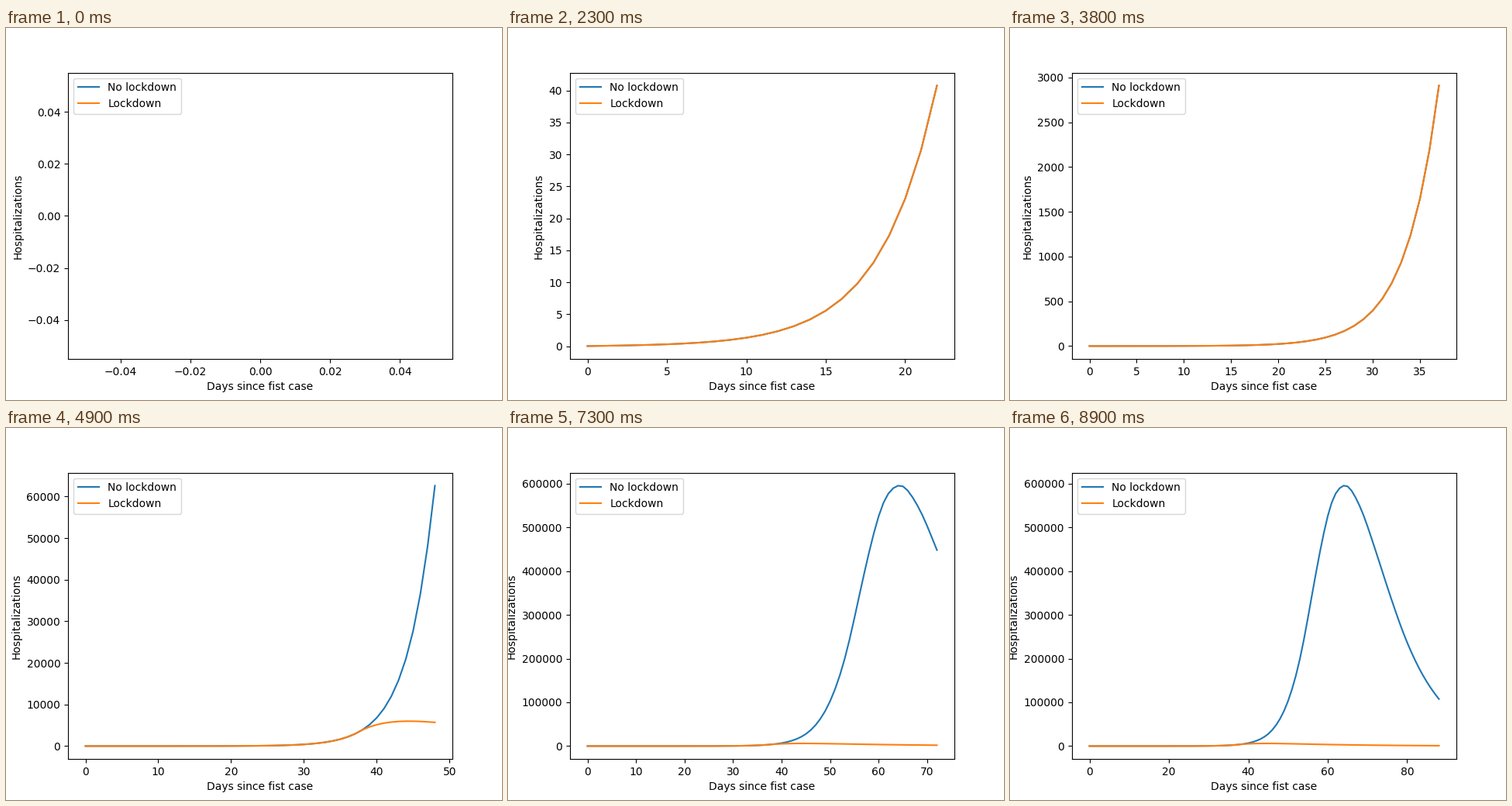
Animation of 640 by 480 pixels, one loop 9 s. Source, as a matplotlib script:

```python
import numpy as np
import matplotlib.pyplot as plt
from matplotlib.animation import FuncAnimation

FRAMES = 90
GROWTH = 0.2846
LOCK_DAY = 38
days = np.arange(FRAMES)


def early(n):
    """Outbreak growth before saturation sets in."""
    return 0.05855 * (np.exp(GROWTH * (n + 1)) - 0.766 ** (n + 1))


def hermite(x, xs, ys):
    """Smooth cubic curve through the points (xs, ys)."""
    m = np.gradient(ys, xs, edge_order=2)
    i = np.clip(np.searchsorted(xs, x, side="right") - 1, 0, len(xs) - 2)
    h = xs[i + 1] - xs[i]
    t = (x - xs[i]) / h
    return (ys[i] * (1 + 2 * t) * (1 - t) ** 2 + ys[i + 1] * t * t * (3 - 2 * t)
            + h * (m[i] * t * (1 - t) ** 2 - m[i + 1] * t * t * (1 - t)))


def no_lockdown():
    # Saturation bends the exponential through these levels (thousands).
    knots = np.arange(32, 89, 4)
    levels = 1000 * np.array([6.78, 20.9, 62.6, 162, 344, 526, 595.7, 550,
                              448.4, 336.8, 237, 161.4, 107.6])
    bend = np.append([0, 0], np.log(levels / early(knots[2:])))
    late = days >= knots[1]
    values = early(days)
    values[late] *= np.exp(hermite(days[late], knots, bend))
    return values


def lockdown(free):
    t = np.maximum(days - LOCK_DAY, 0)
    peak = 11500
    eased = peak * np.exp(-0.052 * t) - (peak - free[LOCK_DAY]) * np.exp(-0.19 * t)
    return np.where(days < LOCK_DAY, free, eased)


free = no_lockdown()
locked = lockdown(free)

fig, ax = plt.subplots(figsize=(6.4, 4.8), dpi=100)


def draw(n):
    ax.clear()
    ax.plot(days[:n], free[:n], label="No lockdown")
    ax.plot(days[:n], locked[:n], label="Lockdown")
    ax.set_xlabel("Days since fist case")
    ax.set_ylabel("Hospitalizations")
    ax.legend(loc="upper left")


anim = FuncAnimation(fig, draw, frames=FRAMES, init_func=lambda: None,
                     interval=100, repeat=True, repeat_delay=0)
plt.show()
```
